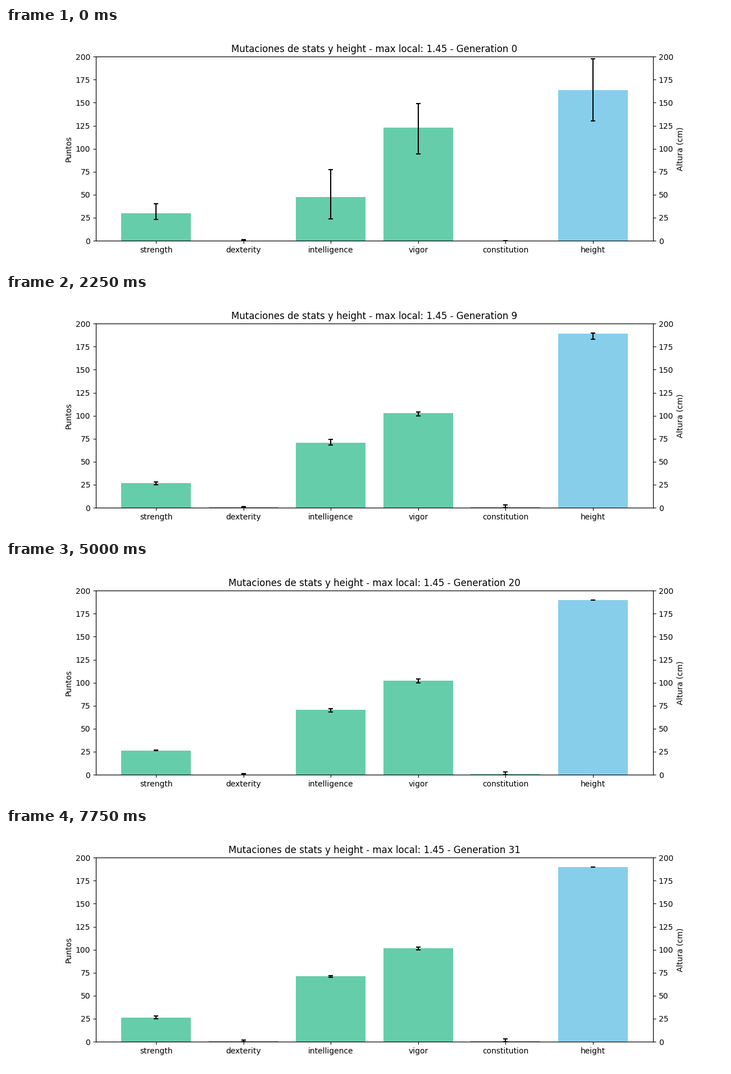
A matplotlib script that plays this animation: 1280x427 px, repeating every 8000 ms.

```python
import numpy as np
import matplotlib.pyplot as plt
from matplotlib.animation import FuncAnimation

GENERATIONS = 32
STEP_MS = 250
STATS = ["strength", "dexterity", "intelligence", "vigor", "constitution", "height"]
KEYS = [0, 4, 9, 13, 20, 24, 31]

# Mean, lowest and highest value of each stat at the key generations.
MEAN = {
    "strength": [30, 26.5, 26.5, 26.2, 26.45, 26.45, 26.2],
    "dexterity": [0.1, 0.1, 0.4, 0.1, 0.1, 0.4, 0.8],
    "intelligence": [47.2, 71.5, 70.6, 69.8, 70.6, 71, 71],
    "vigor": [123, 102.2, 102.6, 102.7, 102.2, 101.8, 101.9],
    "constitution": [0, 0.2, 0.5, 1.3, 0.9, 0.4, 0.9],
    "height": [163.8, 188.9, 189.3, 190],
}
LOW = {
    "strength": [23, 24, 25, 26, 26, 26, 25],
    "dexterity": [0],
    "intelligence": [24, 68, 68, 68, 68, 68, 70],
    "vigor": [94, 101, 100, 102, 100, 100, 100],
    "constitution": [0],
    "height": [130, 183, 183, 190],
}
HIGH = {
    "strength": [40, 28, 28, 28, 27, 28, 28],
    "dexterity": [1, 1, 1, 1, 1, 1, 2],
    "intelligence": [77, 75, 74, 72, 72, 72, 72],
    "vigor": [149, 104, 104, 104, 104, 103, 103],
    "constitution": [0, 2, 3],
    "height": [198, 194, 190, 190],
}


def sample(table, gen):
    """Values of all stats; the first generations converge quickly."""
    first = KEYS[1]
    if gen < first:
        gen = first * (1 - (1 - gen / first) ** 2)
    return np.array([np.interp(gen, KEYS[:len(table[s])], table[s]) for s in STATS])


def add_error_bars(ax, x):
    stems = ax.vlines(x, 0, 0, colors="black", linewidth=1.5, zorder=2)
    caps, = ax.plot([], [], "_", color="black", markersize=6,
                    markeredgewidth=1.5, zorder=2.1)
    return stems, caps


def set_error_bars(parts, x, low, high):
    stems, caps = parts
    stems.set_segments([[(a, b), (a, c)] for a, b, c in zip(x, low, high)])
    caps.set_data(np.concatenate([x, x]), np.concatenate([low, high]))


# The tiny surplus keeps the pixel height from being truncated to 426.
fig, ax = plt.subplots(figsize=(12.8, 4.27001), dpi=100)
ax2 = ax.twinx()
x = np.arange(len(STATS))
points, height = slice(0, 5), slice(5, 6)

groups = []
for axis, part, color in [(ax, points, "mediumaquamarine"), (ax2, height, "skyblue")]:
    bars = axis.bar(x[part], np.zeros(len(x[part])), color=color)
    groups.append((part, bars, add_error_bars(axis, x[part])))
    axis.set_ylim(0, 200)
    axis.set_yticks(np.arange(0, 201, 25))

ax.set_xlim(-0.69, 5.69)
ax.set_xticks(x, STATS)
ax.set_ylabel("Puntos")
ax2.set_ylabel("Altura (cm)")
title = ax.set_title("")


def update(gen):
    mean = sample(MEAN, gen)
    low, high = np.round(sample(LOW, gen)), np.round(sample(HIGH, gen))
    for part, bars, errors in groups:
        for bar, value in zip(bars, mean[part]):
            bar.set_height(value)
        set_error_bars(errors, x[part], low[part], high[part])
    title.set_text(f"Mutaciones de stats y height - max local: 1.45 - Generation {gen}")
    return []


anim = FuncAnimation(fig, update, frames=GENERATIONS, interval=STEP_MS,
                     repeat=True, repeat_delay=0)
plt.show()
```
